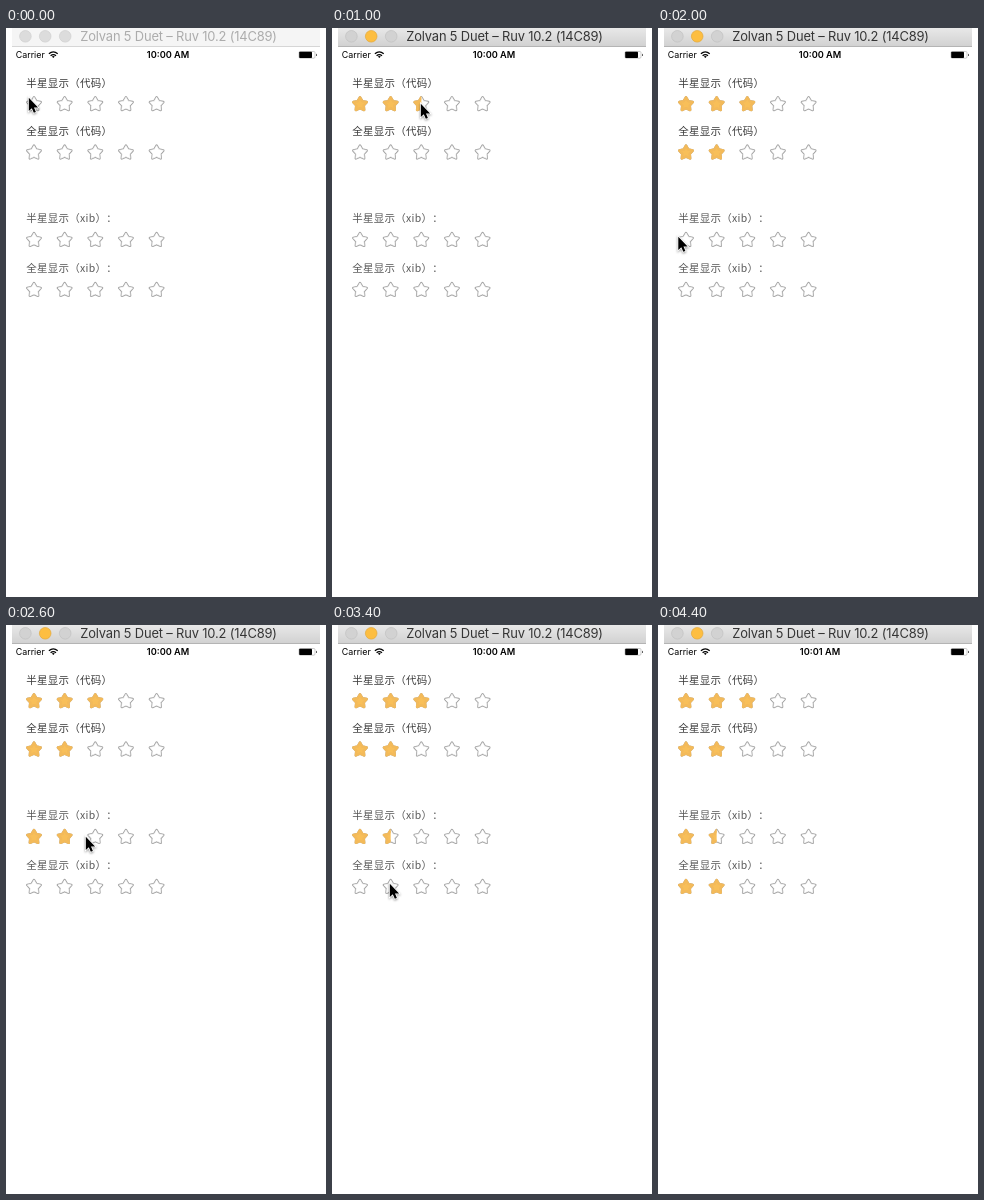
Write an HTML page that moves like this. It is 320x569 px and loops after 4800 ms.

```html
<!DOCTYPE html>
<html lang="zh">
<head>
<meta charset="utf-8">
<title>Star rating</title>
<style>
html, body { margin: 0; width: 100%; height: 100%; overflow: hidden; background: #fff; }
#stage { display: block; width: 100%; height: 100%; }
text { font-family: Inter, Roboto, sans-serif; white-space: pre; }
.label {
  font: 300 10.5px "Noto Sans CJK SC", "Noto Sans CJK", sans-serif;
  letter-spacing: .25px; text-spacing-trim: space-all; font-kerning: none;
}
.status { font-size: 8.9px; }
#cursor { filter: drop-shadow(0 1px .8px #0006); }
</style>
</head>
<body>
<svg id="stage" viewBox="0 0 320 569">
  <defs>
    <linearGradient id="chrome" x2="0" y2="1">
      <stop stop-color="#e8e8e8"/><stop offset="1" stop-color="#d1d1d1"/>
    </linearGradient>
    <path id="star" stroke-linejoin="round"/>
    <g id="empty">
      <use href="#star" fill="#a6a6a6" stroke="#a6a6a6" stroke-width="2.6"/>
      <use href="#star" fill="#fff" stroke="#fff" stroke-width=".7"/>
    </g>
    <use id="full" href="#star" fill="#f8bf59" stroke="#f3ba5a" stroke-width="2.6"/>
  </defs>

  <rect id="bar" x="6" width="308" height="18.5"/>
  <rect id="edge" x="6" y="18" width="308" height="1"/>
  <g id="lights" stroke-width=".7">
    <circle cx="19.4" cy="8.3" r="5.8"/>
    <circle id="amber" cx="39.2" cy="8.3" r="5.8"/>
    <circle cx="59.2" cy="8.3" r="5.8"/>
  </g>
  <text id="title" x="74.3" y="13.3" font-size="12.9" letter-spacing="-.16">Zolvan 5 Duet – Ruv 10.2 (14C89)</text>

  <text class="status" x="9.7" y="30.2">Carrier</text>
  <g fill="none" stroke="#000" stroke-width="1.3">
    <path d="M42.9 25.8Q47.3 21.9 51.7 25.8M44.6 27.7Q47.3 25.4 50 27.7"/>
    <path d="M45.8 28.5Q47.3 27.4 48.8 28.5L47.3 30Z" fill="#000" stroke="none"/>
  </g>
  <text id="clock" x="162" y="30.2" font-size="9.2" font-weight="600" text-anchor="middle"></text>
  <rect x="293" y="23.5" width="16" height="6.7" rx="1.2" fill="#fff" stroke="#999" stroke-width=".5"/>
  <rect x="293.2" y="23.7" width="12.8" height="6.3" rx=".8"/>
  <rect x="310" y="25.7" width="1" height="2.3" rx=".5" fill="#555"/>

  <g id="rows"></g>
  <path id="cursor" d="M.8 .8V13.9L3.8 11.2L5.8 15.8L7.9 14.9L6 10.5H10.1Z"
    stroke="#fff" stroke-width="1.6" paint-order="stroke"/>
</svg>
<script>
const $ = id => document.getElementById(id);
const LOOP = 4800, STEP = 200, GAP = 30.65;

// Each row: label, colour, label baseline, star centre, rating changes as [ms, stars]
const rows = [
  ['半星显示（代码）', '#3c3c3c', 58.6, 76.3, [[200, .5], [600, 1], [1000, 2.5], [1200, 3]]],
  ['全星显示（代码）', '#3c3c3c', 107.1, 124.7, [[1600, 1], [2000, 2]]],
  ['半星显示（xib）：', '#585858', 193.7, 212.1, [[2200, .5], [2600, 2], [2800, 3], [3200, 1.5]]],
  ['全星显示（xib）：', '#585858', 244, 262.1, [[3600, 2]]]
];

// Pointer tip at every step; the third value enlarges it after a shake
const tips = [
  [22, 69], [28, 75], [31, 75], [87, 75], [77, 74], [88, 75], [71, 52, 2.6],
  [30, 123], [30, 124], [54, 124], [19.5, 208], [28, 209.5], [72, 212], [79, 211],
  [84, 211], [46, 211], [70, 231], [57, 258], [283, 304]
];

$('star').setAttribute('d', 'M' + Array.from({length: 10}, (_, i) => {
  const r = i % 2 ? 3.85 : 7, a = i * Math.PI / 5;
  return `${(r * Math.sin(a)).toFixed(2)} ${(-r * Math.cos(a)).toFixed(2)}`;
}).join('L') + 'Z');

const stars = (kind, x, y) =>
  [0, 1, 2, 3, 4].map(i => `<use href="#${kind}" x="${x + i * GAP}" y="${y}"/>`).join('');

$('rows').innerHTML = rows.map(([label, colour, base, y], i) =>
  `<text class="label" x="20.3" y="${base}" fill="${colour}">${label}</text>` + stars('empty', 28, y) +
  `<svg id="fill${i}" x="19.5" y="${y - 9}" width="0" height="18">${stars('full', 8.5, 9)}</svg>`
).join('');

function paint(id, fill, stroke) {
  $(id).setAttribute('fill', fill);
  if (stroke) $(id).setAttribute('stroke', stroke);
}

function draw(t) {
  const active = t >= 200;
  paint('bar', active ? 'url(#chrome)' : '#f5f5f5');
  paint('edge', active ? '#b4b4b4' : '#d6d6d6');
  paint('title', active ? '#353535' : '#acacac');
  paint('lights', active ? '#d2d2d2' : '#dcdcdc', active ? '#c0c0c0' : '#cfcfcf');
  paint('amber', active ? '#fdbe41' : '#dcdcdc', active ? '#e2a83a' : '#cfcfcf');
  $('clock').textContent = t < 4400 ? '10:00 AM' : '10:01 AM';

  rows.forEach(([, , , , changes], i) => {
    const value = changes.reduce((v, [ms, n]) => t >= ms ? n : v, 0);
    const whole = Math.floor(value);
    $('fill' + i).setAttribute('width', whole * GAP + (value - whole) * 17);
  });

  const tip = tips[Math.floor(t / STEP)];
  $('cursor').style.display = tip ? '' : 'none';
  if (tip) $('cursor').setAttribute('transform', `translate(${tip[0]} ${tip[1]}) scale(${tip[2] || 1})`);
}

const start = performance.now();
function frame() {
  draw((performance.now() - start) % LOOP);
  requestAnimationFrame(frame);
}
frame();
</script>
</body>
</html>
```
